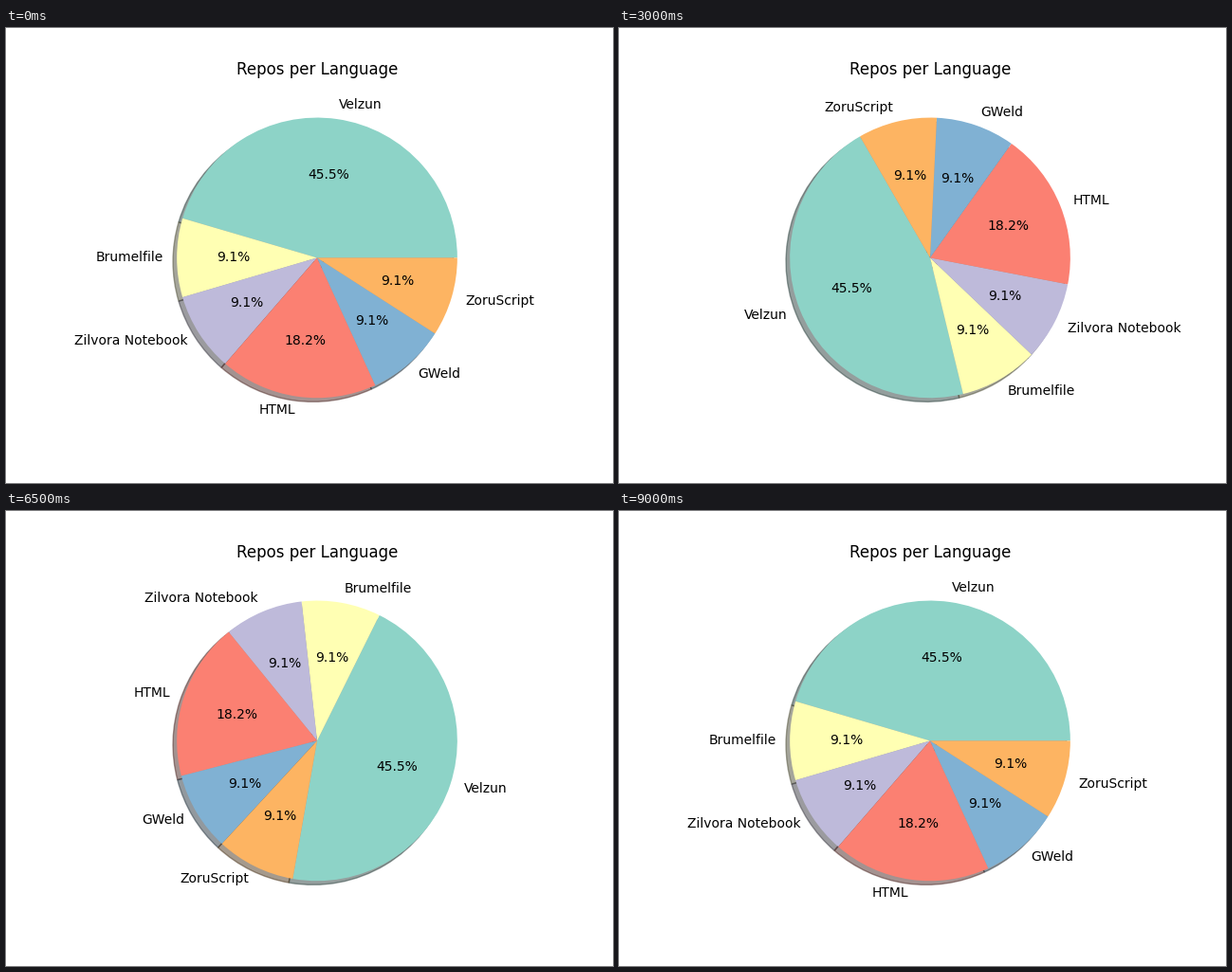
Write a matplotlib script that moves like this. It is 640 px wide and 480 px high and loops after 9.1 s.

```python
import matplotlib.pyplot as plt
from matplotlib.animation import FuncAnimation

plt.rcParams["font.family"] = "DejaVu Sans"

FRAMES = 91
STEP = 4  # degrees turned per frame

LABELS = ["Velzun", "Brumelfile", "Zilvora Notebook", "HTML", "GWeld", "ZoruScript"]
COUNTS = [5, 1, 1, 2, 1, 1]
COLORS = plt.get_cmap("Set3").colors[:len(COUNTS)]

fig, ax = plt.subplots(figsize=(6.4, 4.8), dpi=100)


def update(i):
    ax.clear()
    ax.pie(COUNTS, labels=LABELS, colors=COLORS, autopct="%1.1f%%",
           shadow=True, startangle=i * STEP)
    ax.set_title("Repos per Language")
    return []


anim = FuncAnimation(fig, update, frames=FRAMES, init_func=lambda: update(0),
                     interval=100, repeat=True, repeat_delay=0)
plt.show()
```
